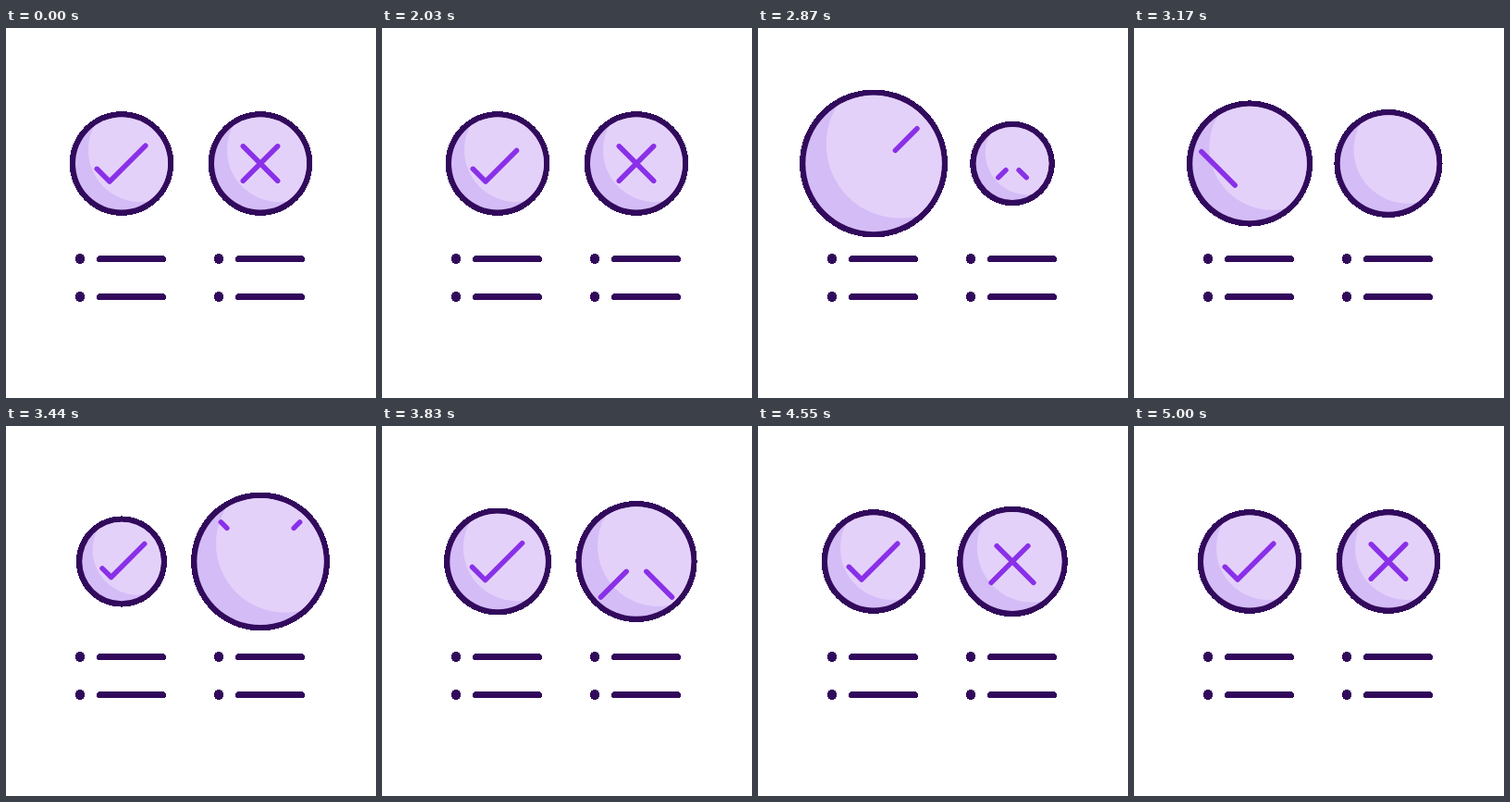
An HTML page that plays this animation: 400 px wide and 400 px high, repeating every 5.12 s.

```html
<!DOCTYPE html>
<html lang="en">
<head>
<meta charset="utf-8">
<title>Pros and cons</title>
<style>
  html, body { margin: 0; width: 100%; height: 100%; overflow: hidden; background: #fff; }
  svg { display: block; width: 100vw; height: 100vh; }
  .dark { fill: #320a5c; shape-rendering: crispEdges; }
  .shade { fill: #d4bcf6; }
  .light { fill: #e4d1fa; }
  .mark { fill: none; stroke: #8930e8; stroke-width: 5.5; stroke-linecap: round; stroke-linejoin: round; }
</style>
</head>
<body>
<svg id="stage" viewBox="0 0 400 400"></svg>
<script>
const LOOP = 5120, MOVE_START = 2030, STEP = 30;
const REST = 56, OUTLINE = 6, CENTER_Y = 146.5;
const ERASE_TIME = 300, RETURN_TIME = 650;
const stage = document.getElementById('stage');

function set(node, attrs) {
  for (const key in attrs) node.setAttribute(key, attrs[key]);
  return node;
}

function add(parent, tag, attrs = {}) {
  const node = document.createElementNS('http://www.w3.org/2000/svg', tag);
  return parent.appendChild(set(node, attrs));
}

const mix = (a, b, x) => a + (b - a) * x;
const ease = x => (1 - Math.cos(Math.PI * Math.min(1, Math.max(0, x)))) / 2;

// Swings from one [time, value] extreme to the next.
function swing(t, extremes) {
  return extremes.reduce(([t0, v0], [t1, v1]) =>
    [t1, mix(v0, v1, ease((t - t0) / (t1 - t0)))])[1];
}

// Scale of a badge: dip, big bulge, then a fading bounce.
const badgeScale = (t, peak) =>
  swing(t, [[30, 1], [200, 0.81], [935, peak], [1480, 0.863], [1985, 1.076], [2350, 1]]);

// Distance of the returning mark from its place, in mark lengths.
const markOffset = t =>
  swing(t, [[700, 1.4], [1190, -0.75], [1560, 0.3], [1965, -0.1], [2350, 0]]);

// Each mark is the part low..high of a track that runs on to the badge's edge.
const tick = {
  x: 125, start: 2000, peak: 1.435, low: -13.7, high: 38.8, track: [-30, 46], corner: true,
  strokes: [u => [u - 13, 19.5 - Math.abs(u)]]
};
const cross = {
  x: 275, start: 2650, peak: 1.386, low: -18.7, high: 18.7, track: [-33, 32], corner: false,
  strokes: [u => [u, -u], u => [-u, -u]]
};
const badges = [tick, cross];

badges.forEach((badge, i) => {
  badge.clip = add(add(stage, 'clipPath', { id: 'disc' + i }), 'circle');
  const group = add(stage, 'g', { transform: `translate(${badge.x} ${CENTER_Y})` });
  badge.rim = add(group, 'circle', { class: 'dark' });
  badge.shade = add(group, 'circle', { class: 'shade' });
  badge.light = add(add(group, 'g', { 'clip-path': `url(#disc${i})` }), 'circle', { class: 'light' });
  badge.mark = add(group, 'path', { class: 'mark' });

  for (const y of [249.5, 290.5]) {
    add(stage, 'circle', { class: 'dark', cx: badge.x - 45, cy: y, r: 5.4 });
    add(stage, 'rect', { class: 'dark', x: badge.x - 27, y: y - 3.5, width: 75, height: 7, rx: 3.5 });
  }
});

function markRange({ low, high, track }, t) {
  if (t < RETURN_TIME) return [low, mix(high, low, Math.max(0, t / ERASE_TIME))];
  const shift = markOffset(t) * (high - low);
  return [Math.max(track[0], low + shift), Math.min(track[1], high + shift)];
}

function markPath(badge, t, scale) {
  const [from, to] = markRange(badge, t);
  if (to <= from) return '';
  const stops = badge.corner && from < 0 && to > 0 ? [from, 0, to] : [from, to];
  return badge.strokes.map(point =>
    'M' + stops.map(u => point(u).map(v => (v * scale).toFixed(2))).join('L')).join('');
}

function draw(time) {
  const now = time < MOVE_START ? 0 : time - (time - MOVE_START) % STEP;
  for (const badge of badges) {
    const t = now - badge.start, scale = badgeScale(t, badge.peak), r = REST * scale;
    set(badge.rim, { r: r + 0.3 });
    for (const disc of [badge.clip, badge.shade]) set(disc, { r: r - OUTLINE });
    set(badge.light, { cx: 20 * scale, cy: -14.5 * scale, r });
    set(badge.mark, { d: markPath(badge, t, scale) });
  }
}

const begin = performance.now();
function frame() {
  draw((performance.now() - begin) % LOOP);
  requestAnimationFrame(frame);
}
frame();
</script>
</body>
</html>
```
